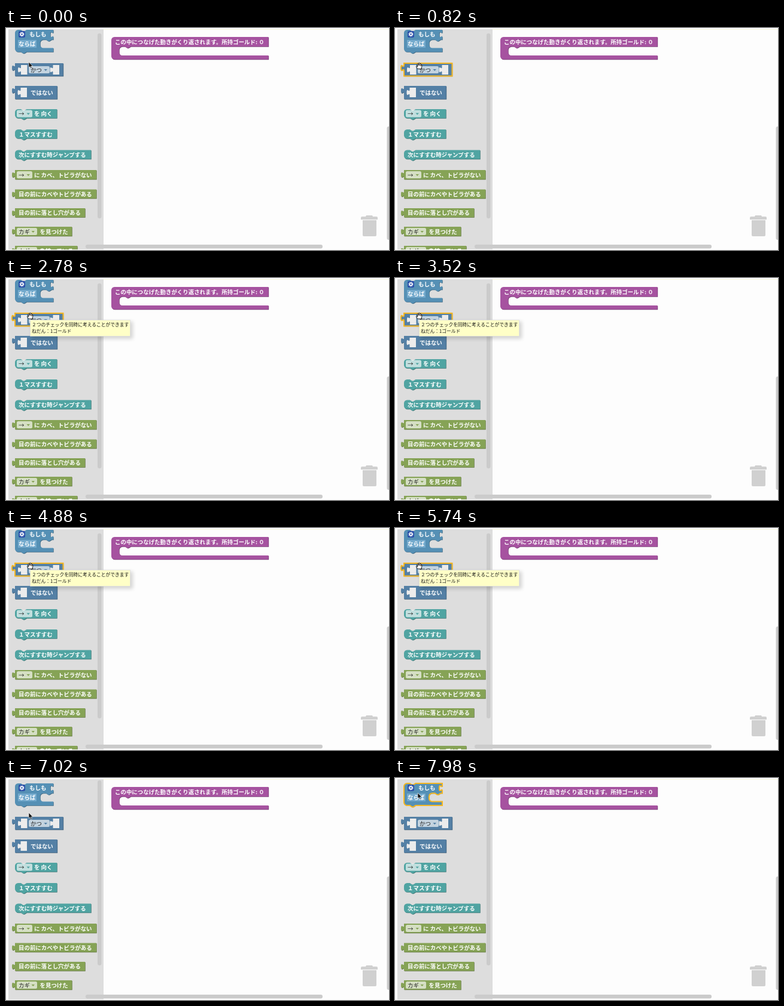
Write an HTML page that moves like this. It is 640 px wide and 372 px high and loops after 8000 ms.

```html
<!DOCTYPE html>
<html lang="ja">
<head>
<meta charset="utf-8">
<style>
  html, body { margin: 0; width: 100%; height: 100%; overflow: hidden; background: #fdfdfd; }
  svg { display: block; width: 640px; height: 372px; }
  text { font: 700 9.45px "Noto Sans CJK JP", "Noto Sans CJK", sans-serif; fill: #fff; white-space: pre; }
  .field { font-weight: 500; fill: #222; }
  .tip text { font-weight: 400; font-size: 7.74px; fill: #111; }
  .hover .edge { stroke: #f5b722; stroke-width: 2; }
</style>
</head>
<body>
<svg viewBox="0 0 640 372">
  <defs>
    <clipPath id="panelClip"><rect x="4" y="2" width="159" height="369"/></clipPath>
    <filter id="soft" x="-20%" y="-60%" width="140%" height="220%"><feGaussianBlur stdDeviation="3"/></filter>
  </defs>
  <path d="M4 2.5H640" stroke="#f8f8dc"/>
  <g id="workspace"></g>
  <g id="trash" fill="#d0d0d0">
    <path d="M593 321v-3q0-2 2-2h6l1-2h10l1 2h6q2 0 2 2v3z"/>
    <path d="M596 322h23v25q0 2-2 2h-19q-2 0-2-2z"/>
  </g>
  <g clip-path="url(#panelClip)">
    <rect x="4" y="2" width="159" height="369" fill="#ddd"/>
    <g id="blocks"></g>
  </g>
  <g fill="#cbcbcb">
    <rect id="panelBar" x="153" y="9" width="6.500" height="310" rx="3.200"/>
    <rect x="133" y="363" width="396" height="6.500" rx="3.200"/>
    <rect x="636.500" y="165" width="6.500" height="190" rx="3.200"/>
  </g>
  <g id="tip" class="tip">
    <rect x="43" y="73" width="169" height="29" opacity=".16" filter="url(#soft)"/>
    <rect x="40.500" y="70.500" width="167" height="27" fill="#ffffc7" stroke="#ddd" stroke-width=".7"/>
    <text x="43" y="81">２つのチェックを同時に考えることができます</text>
    <text x="43" y="92">ねだん：1ゴールド</text>
  </g>
  <path id="arrow" d="M0 0V9.500L2.200 7.500L3.700 11L5.300 10.300L3.800 7H6.800Z" fill="#111" stroke="#fff" stroke-width=".6"/>
  <path id="hand" d="M-2.200 5.500L-4.500 2Q-4.800 .5-3.200 1L-2 2.200L-3-2.500Q-2.500-4-1.400-3L-.6 0L-.6-4Q.3-5.400 1.200-4L1.300 0L2-3.300Q3.300-4.200 3.600-2.700L3.200 .8L4.300-1.200Q5.500-1.500 5.200 0L4 5.500Z" fill="#fff" stroke="#111" stroke-width=".9" stroke-linejoin="round"/>
</svg>
<script>
const $ = id => document.getElementById(id);
const IF = '#5590b5', LOGIC = '#5480a5', MOVE = '#50a4a2', CHECK = '#86a356', LOOP = '#a653a0';
const LEFT = 15;

// Connector outlines shared by every block
const TAB_UP = 'c0-6.400-5 5-5-4.800s5 1.600 5-4.800';
const TAB_DOWN = 'c0 6.400-5-5-5 4.800s5-1.600 5 4.800';
const NOTCH_RIGHT = 'l3.900 2.600h1.900l3.900-2.600';
const NOTCH_LEFT = 'l-3.900 2.600h-1.900l-3.900-2.600';
const CORNER = 'a5.200 5.200 0 0 1 ';

const label = (x, mid, string, cls = '') =>
  `<text x="${x}" y="${mid + 3.5}" class="${cls}">${string}</text>`;

const dropdown = (x, mid, width, string, color) =>
  `<rect x="${x}" y="${mid - 6}" width="${width}" height="12" rx="2.500" fill="#fff" opacity=".65"/>` +
  label(x + 3, mid, string, 'field') +
  `<path d="M${x + width - 9.5} ${mid - 1}h5.500l-2.750 3z" fill="${color}"/>`;

const slot = (x, y) =>
  `<path d="M${x} ${y}h10.500v16h-10.500v-3.100${TAB_UP}z" fill="#ececec"/>`;

const block = (path, color, content, id = '') =>
  `<g id="${id}"><path d="${path}" transform="translate(.7 .7)" fill="${color}" style="filter:brightness(.7)"/>` +
  `<path class="edge" d="${path}" fill="${color}"/>${content}</g>`;

const valuePath = (y, right, height) =>
  `M${LEFT} ${y}H${right}v${height}H${LEFT}V${y + 12.9}${TAB_UP}z`;

const stackPath = (y, right, height) =>
  `M${LEFT} ${y + 5.2}${CORNER}5.200-5.200H24.700${NOTCH_RIGHT}H${right}v${height}` +
  `H34.400${NOTCH_LEFT}H20.200${CORNER}-5.200-5.200z`;

// Mouth of a block that wraps other blocks
const mouth = (inner, right, height) =>
  `H${inner + 19.3}${NOTCH_LEFT}h-4.400a5.200 5.200 0 0 0-5.200 5.200v${height - 10.4}` +
  `a5.200 5.200 0 0 0 5.200 5.200H${right}`;

const ifPath = `M15 8.200${CORNER}5.200-5.200H24.700${NOTCH_RIGHT}H79v3.300${TAB_DOWN}V19.500` +
  mouth(57, 79, 14) + `V40H34.400${NOTCH_LEFT}H20.200${CORNER}-5.200-5.200z`;

const loopPath = `M176 20.200${CORNER}5.200-5.200H438.500V31` +
  mouth(189, 438.5, 15) + `V52.500H181.200${CORNER}-5.200-5.200z`;

const gear = `<rect x="21" y="5" width="11" height="11" rx="2.500" fill="#2b4fa8"/>
  <circle cx="26.500" cy="10.500" r="3.100" fill="none" stroke="#fff" stroke-width="1.700" stroke-dasharray="1.400 1.030"/>
  <circle cx="26.500" cy="10.500" r="2" fill="none" stroke="#fff" stroke-width="1.300"/>`;

const selection = '<rect x="20" y="20" width="31" height="13" fill="#8fbfe2" opacity=".55"/>';

$('workspace').innerHTML = block(loopPath, LOOP,
  label(182, 23, 'この中につなげた動きがくり返されます。所持ゴールド: ０'));

$('blocks').innerHTML = [
  block(ifPath, IF, gear + label(39, 10, 'もしも') + selection + label(21, 26, 'ならば'), 'ifBlock'),
  block(valuePath(59, 95.5, 21.5), LOGIC,
    slot(25, 62) + dropdown(38, 70, 35, 'かつ', LOGIC) + slot(78.5, 62), 'andBlock'),
  block(valuePath(97, 85.5, 22), LOGIC, slot(24.5, 100) + label(41, 108, 'ではない')),
  block(stackPath(136, 85, 15), MOVE, dropdown(18, 143.5, 26, '→', MOVE) + label(47, 143.5, 'を 向く')),
  block(stackPath(170, 85, 15), MOVE, label(21, 178, '１マスすすむ')),
  block(stackPath(204.5, 142, 15), MOVE, label(21, 212, '次にすすむ時ジャンプする')),
  block(valuePath(238, 151, 15.5), CHECK,
    dropdown(18, 246, 26, '→', CHECK) + label(47, 246, 'に カベ、トビラがない')),
  block(valuePath(270.5, 151, 15), CHECK, label(21, 278, '目の前にカベやトビラがある')),
  block(valuePath(302, 132, 15), CHECK, label(21, 309.5, '目の前に落とし穴がある')),
  block(valuePath(333, 110, 15.5), CHECK,
    dropdown(18, 341, 34, 'カギ', CHECK) + label(56.5, 341, 'を見つけた')),
  block(valuePath(365, 119, 15.5), CHECK,
    dropdown(18, 373, 34, 'カギ', CHECK) + label(56.5, 373, 'を持っている'))
].join('');

const LOOP_MS = 8000;
const progress = (t, from, to) => Math.min(1, Math.max(0, (t - from) / (to - from)));
const ease = p => p * p * (3 - 2 * p);
const show = (id, on) => $(id).setAttribute('visibility', on ? 'visible' : 'hidden');
const move = (id, x, y) => $(id).setAttribute('transform', `translate(${x} ${y})`);

function draw(t) {
  const scroll = 6 * progress(t, 5860, 6460);
  const arrive = ease(progress(t, 20, 320));
  const leave = ease(progress(t, 6900, 7600));
  const onAnd = t >= 140 && t < 7000;

  move('blocks', 0, scroll);
  $('panelBar').setAttribute('y', 9 - scroll * 0.85);
  $('andBlock').classList.toggle('hover', onAnd);
  $('ifBlock').classList.toggle('hover', t >= 7400);
  show('tip', t >= 2640 && t < 7000);

  show('hand', onAnd);
  show('arrow', !onAnd);
  move('hand', 40 - 2 * leave, 62 + arrive - 37 * leave);
  move('arrow', 38, 57 + 4 * arrive - 36 * leave);
}

function tick() {
  draw(performance.now() % LOOP_MS);
  requestAnimationFrame(tick);
}
tick();
</script>
</body>
</html>
```
